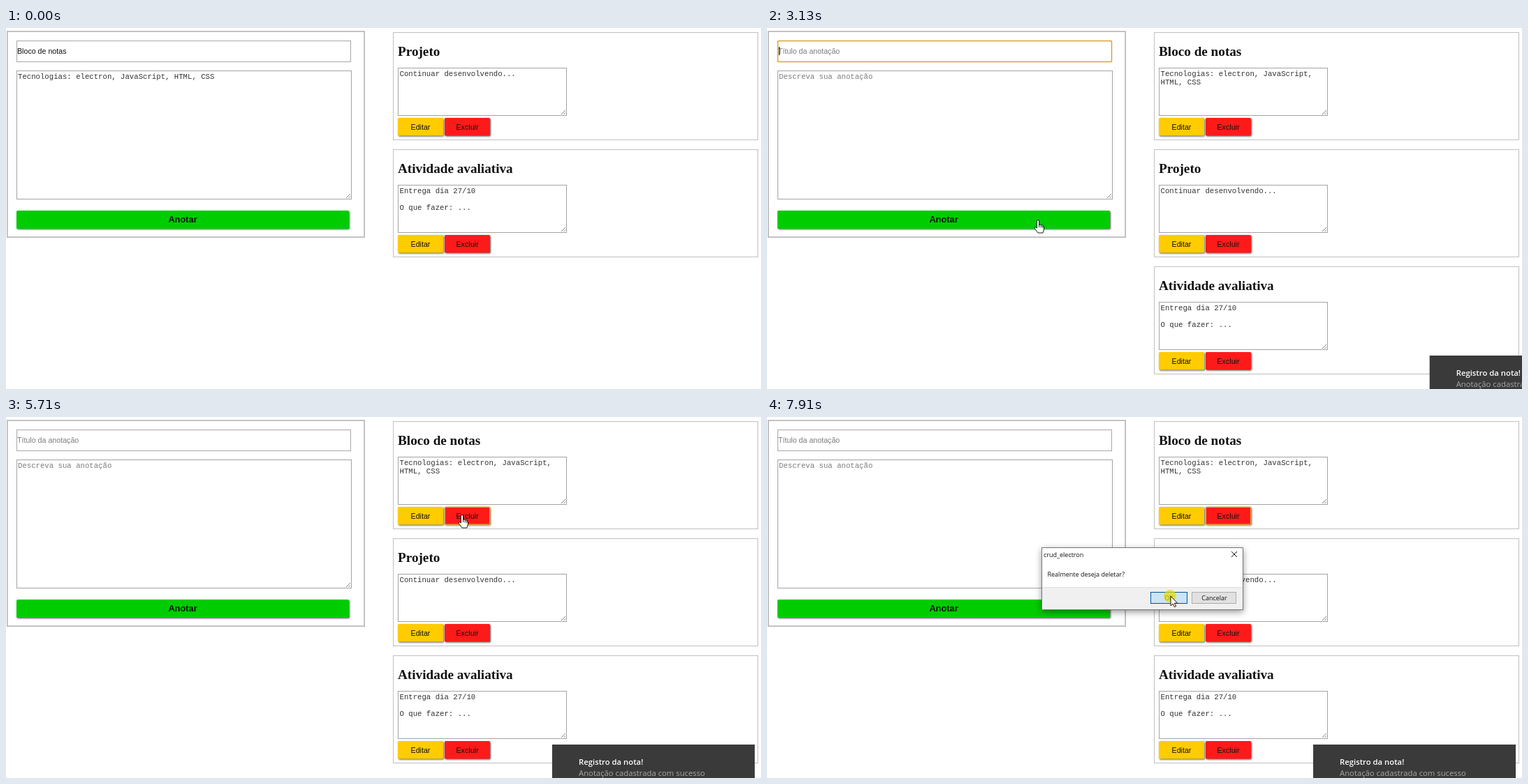
An HTML page for the animation above (7.99 s loop, 1081 by 518 pixels).

```html
<!DOCTYPE html>
<html lang="pt">
<head>
<meta charset="utf-8">
<title>Bloco de notas</title>
<style>
html, body { margin: 0; width: 100%; height: 100%; overflow: hidden; background: #fff; }
svg { position: absolute; left: 0; top: 0; }
text { white-space: pre; }
.sans { font: 10.667px "Liberation Sans", Arial, sans-serif; fill: #111; }
.mono { font: 10.667px "Liberation Mono", "Courier New", monospace; fill: #333; }
.head { font: bold 19.2px "Liberation Serif", "Times New Roman", serif; fill: #111; }
.main { font: bold 12.8px "Liberation Sans", Arial, sans-serif; fill: #0a120a; }
.ui { font: 9px "Open Sans", "Noto Sans", sans-serif; fill: #111; }
.toast { font: 11.3px "Open Sans", "Noto Sans", sans-serif; fill: #a8a8a8; }
.strong { font-weight: 600; fill: #fff; }
.hint { fill: #7d7d7d; }
.mid { text-anchor: middle; }
.raised { filter: drop-shadow(1px 1px 1px rgba(0, 0, 0, .65)); }
.window { filter: drop-shadow(0 3px 5px rgba(0, 0, 0, .4)); }
</style>
</head>
<body>
<svg id="stage" width="1081" height="518" viewBox="0 0 1081 518"></svg>
<script>
const LOOP = 7990;
const stage = document.getElementById('stage');
const RING = '#dca03c';

// Cursor moves: start, end, number of steps, from, to, easing power
const moves = [
  [70, 360, 5, [990, 526], [800, 444], 1],
  [590, 1050, 7, [800, 444], [452, 252], 1.2],
  [1130, 1360, 4, [452, 252], [400, 265], 1.3],
  [1430, 1590, 3, [400, 265], [388, 275], 1],
  [4320, 5080, 11, [388, 275], [646, 146], 1.85],
  [5160, 5240, 2, [646, 146], [653, 140], 1],
  [6330, 6650, 5, [653, 140], [590, 223], 1.2],
  [6730, 7270, 8, [590, 223], [578, 257], 1.4]
];

const projeto = ['Projeto', 'Continuar desenvolvendo...'];
const atividade = ['Atividade avaliativa', 'Entrega dia 27/10', '', 'O que fazer: ...'];
const bloco = ['Bloco de notas', 'Tecnologias: electron, JavaScript,', 'HTML, CSS'];

// Held progress: the first step is already taken at the start time
function progress(t, start, end, n) {
  if (t < start) return 0;
  if (t >= end) return 1;
  return (Math.floor((t - start) / (end - start) * (n - 1) + .05) + 1) / n;
}
const easeOut = (p, power) => 1 - (1 - p) ** power;

const text = (cls, x, y, s) => `<text class="${cls}" x="${x}" y="${y}">${s}</text>`;
const rect = (x, y, w, h, fill, extra = '') =>
  `<rect x="${x}" y="${y}" width="${w}" height="${h}" fill="${fill}" ${extra}/>`;
const frame = (x, y, w, h, color, fill = '#fff', lw = 1) =>
  rect(x + lw / 2, y + lw / 2, w - lw, h - lw, fill, `stroke="${color}" stroke-width="${lw}"`);
const ring = (x, y, w, h) =>
  rect(x, y, w, h, 'none', `rx="1.5" stroke="${RING}" stroke-width="1.5"`);

function area(x, y, w, h) {
  const r = x + w - 2, b = y + h - 2;
  return frame(x, y, w, h, '#a3a3a3') +
    `<path d="M${r - 6} ${b}L${r} ${b - 6}M${r - 2.5} ${b}L${r} ${b - 2.5}" stroke="#777" stroke-width=".9"/>`;
}

function button(x, y, w, h, fill, cls, label, baseline, focused) {
  return rect(x, y, w, h, fill, 'rx="1.5" class="raised"') +
    (focused ? ring(x + .3, y + .3, w - .6, h - .6) : '') +
    text(cls + ' mid', x + w / 2, baseline, label);
}

function card([title, ...lines], i, focused) {
  const y = 168 * i;
  return frame(554, y + 6, 523, 155, '#c0c0c0') +
    text('head', 561, y + 40, title) +
    area(561, y + 57, 242, 69) +
    lines.map((s, k) => text('mono', 563.5, y + 69 + 12 * k, s)).join('') +
    button(561, y + 129, 65, 25.5, '#fc0', 'sans', 'Editar', y + 146, false) +
    button(628, y + 129, 65, 25.5, '#ff1a1a', 'sans', 'Excluir', y + 146, focused);
}

function form(t) {
  const cleared = t >= 2670, focused = t >= 2750 && t < 5710;
  const caret = focused && Math.floor((t - 2750) / 530) % 2 === 0;
  return frame(1, 4, 513, 297, '#bcbcbc', '#fff', 1.8) +
    frame(15, 18, 479, 31, '#a8a8a8') +
    (focused ? ring(15.5, 18.5, 478, 30) : '') +
    text(cleared ? 'sans hint' : 'sans', 16, 37, cleared ? 'Título da anotação' : 'Bloco de notas') +
    (caret ? rect(17, 27, 1, 12, '#000') : '') +
    area(15, 61, 480, 185) +
    text(cleared ? 'mono hint' : 'mono', 17, 73,
      cleared ? 'Descreva sua anotação' : 'Tecnologias: electron, JavaScript, HTML, CSS') +
    button(15, 262, 476, 26, '#0c0', 'main', 'Anotar', 278.5, t >= 2450 && t < 2670);
}

function toast(t) {
  if (t < 3130) return '';
  const shift = 300 * (1 - progress(t, 3130, 3670, 8)) ** 4.4;
  return `<g transform="translate(${shift.toFixed(1)} 0)">` +
    rect(782, 470, 290, 48, '#3a3a3a') +
    text('toast strong', 820, 499, 'Registro da nota!') +
    text('toast', 820, 515, 'Anotação cadastrada com sucesso') + '</g>';
}

function dialog(t, [x, y]) {
  if (t < 6030) return '';
  const shown = easeOut(progress(t, 6030, 6260, 4), 2);
  const hover = x > 549 && x < 602 && y > 251 && y < 268;
  const ok = t >= 7760 ? frame(549, 251, 53, 17, '#005499', '#cce4f7')
    : hover ? frame(549, 251, 53, 17, '#0078d7', '#e5f1fb')
    : frame(549, 251, 53, 17, '#0078d7', '#e1e1e1', 1.7);
  return `<g opacity="${shown}" transform="translate(537 232) scale(${1 - .1 * (1 - shown)}) translate(-537 -232)">` +
    rect(393, 187, 289, 90, '#fff', 'class="window"') +
    rect(394, 244, 287, 32, '#f0f0f0') +
    rect(394, 244, 287, 1, '#dfdfdf') +
    frame(393, 187, 289, 90, '#777', 'none') +
    text('ui', 396, 200.5, 'crud_electron') +
    text('ui', 401.5, 229, 'Realmente deseja deletar?') +
    '<path d="M665 193l8 8m0-8l-8 8" stroke="#111"/>' +
    ok + text('ui mid', 575.5, 263, 'OK') +
    frame(608, 251, 64, 17, '#adadad', '#e1e1e1') + text('ui mid', 640.5, 263, 'Cancelar') + '</g>';
}

function cursorAt(t) {
  const move = moves.filter(m => t >= m[0]).pop();
  if (!move) return [-50, -50];
  const [start, end, n, from, to, power] = move;
  const p = easeOut(progress(t, start, end, n), power);
  return from.map((v, i) => v + (to[i] - v) * p);
}

function cursor(t, [x, y]) {
  const hand = t < 5880 &&
    (x > 15 && x < 491 && y > 262 && y < 288 || x > 561 && x < 693 && y > 129 && y < 155);
  const shape = hand
    ? 'M-1.6 12V2Q-1.6 .5 0 .5T1.6 2V8Q1.8 6.5 3 6.8T4.3 8.5Q4.8 7.2 6 7.7T6.8 9.5Q8.5 8.4 8.5 10.5V14L7 19H0L-4.8 12.5Q-5 10.5 -3.3 10.8ZM1.6 8V11M4.3 8.5V11.5M6.8 9.5V12'
    : 'M0 0V13.8L3.2 11 5.4 15.6 7.6 14.6 5.4 10.2H9.8Z';
  const click = t >= 7760
    ? `<circle cx="577" cy="257" r="${9 * progress(t, 7760, 7910, 3)}" fill="#e6dc00" opacity=".72"/>` : '';
  return click + `<path transform="translate(${x.toFixed(1)} ${y.toFixed(1)})" d="${shape}" ` +
    'fill="#fff" stroke="#000" stroke-width=".9" stroke-linejoin="round"/>';
}

let last = '';
function draw(now) {
  const t = now % LOOP;
  const notes = t < 2820 ? [projeto, atividade] : [bloco, projeto, atividade];
  const point = cursorAt(t);
  const picture = form(t) +
    notes.map((note, i) => card(note, i, i === 0 && t >= 5710)).join('') +
    toast(t) + dialog(t, point) + cursor(t, point);
  if (picture !== last) stage.innerHTML = last = picture;
}

let began;
function tick(now) {
  began ??= now;
  draw(now - began);
  requestAnimationFrame(tick);
}
draw(0);
requestAnimationFrame(tick);
</script>
</body>
</html>
```
